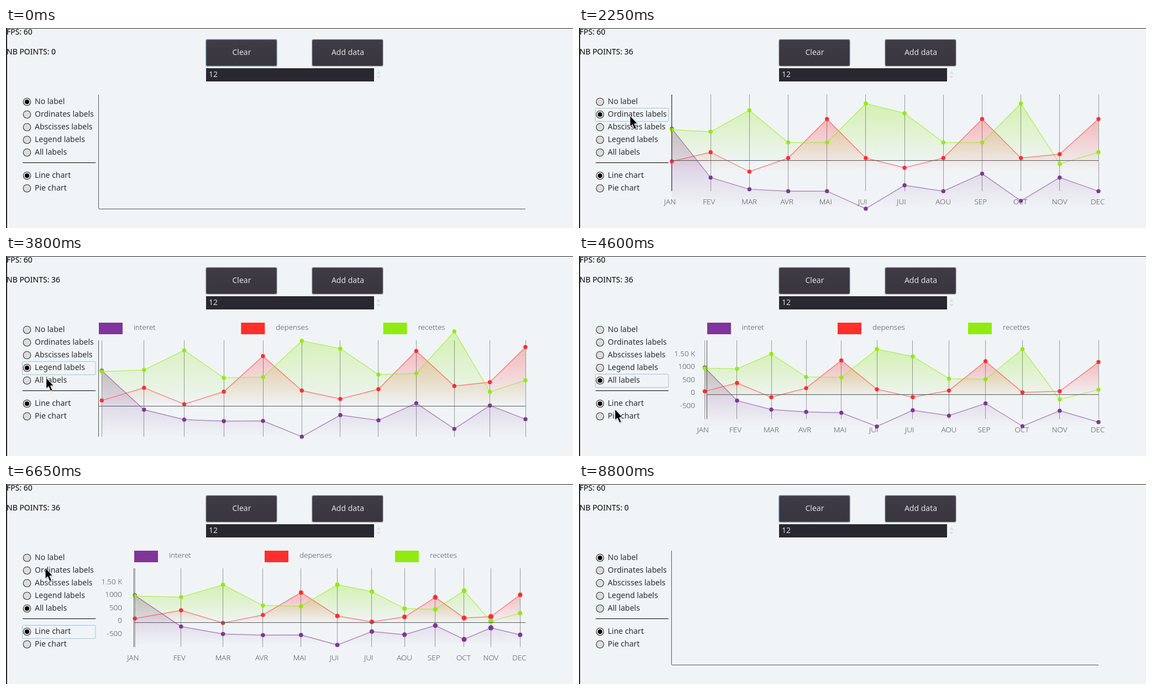
Recreate the animation shown at these times as an HTML page with a canvas. Size 1026 px wide and 363 px high, loop 9.45 s.

```html
<!DOCTYPE html>
<html>
<head>
<meta charset="utf-8">
<style>
html, body { margin: 0; width: 100%; height: 100%; overflow: hidden; background: #f0f4f6; }
canvas { display: block; }
</style>
</head>
<body>
<canvas id="stage" width="1026" height="363"></canvas>
<script>
const c = document.getElementById('stage').getContext('2d');
const LOOP = 9450, TICK = 50;
const UI = '14px "Noto Sans", sans-serif';
const THIN = '300 13.5px "Open Sans", sans-serif';

// Chart data, in units of 50
const MIN = -19, MAX = 35;
const series = [
  { name: 'interet', rgb: '127,54,152', values: [21, -3, -9, -10, -10, -19, -7, -10, -1, -15, -3, -10] },
  { name: 'depenses', rgb: '255,47,47', values: [3, 10, 0, 7, 27, 7, 2, 7, 27, 7, 9, 27] },
  { name: 'recettes', rgb: '145,235,16', values: [20.5, 20.5, 31.5, 15, 15, 35, 30, 15, 15, 35, 4, 10] }
];
const months = 'JAN FEV MAR AVR MAI JUI JUI AOU SEP OCT NOV DEC'.split(' ');
const radios = ['No label', 'Ordinates labels', 'Abscisses labels', 'Legend labels', 'All labels', 'Line chart', 'Pie chart'];

const layout = (months, values, legend) =>
  ({ months, values, legend, left: values ? 232 : 168, top: legend ? 153 : 121, bottom: months ? 296 : 328 });
const PLAIN = layout(0, 0, 0), ALL = layout(1, 1, 1);

// Clicks: time, focused radio, layout, start point of newly made dots
const ADD = 870, PIE = 4900, LINE = 6181, CLEAR = 8450;
const steps = [
  { t: ADD, row: -1, lay: PLAIN, from: [940, 328] },
  { t: 2200, row: 1, lay: layout(1, 0, 0) },
  { t: 2833, row: 2, lay: layout(0, 1, 0) },
  { t: 3500, row: 3, lay: layout(0, 0, 1) },
  { t: 4285, row: 4, lay: ALL },
  { t: LINE, row: 5, lay: ALL, from: [882, 268] },
  { t: 6860, row: 0, lay: PLAIN }
];

// Pointer stops (time, x, y) and the moments where the picture rests 150 ms
const mouse = [
  [150, 93, 0], [300, 215, 150], [650, 610, 42], [1200, 610, 42], [1350, 421, 163], [2050, 96, 148],
  [3050, 77, 203], [3550, 75, 203], [4600, 65, 278], [5300, 66, 284], [5950, 72, 262], [6200, 72, 262],
  [6650, 71, 152], [6850, 71, 127], [7900, 71, 127], [8300, 440, 42], [8650, 470, -30]
];
const rests = [650, 1200, 2050, 8300];

const mix = (a, b, p) => a + (b - a) * p;
const clamp = v => Math.max(0, Math.min(1, v));
const circOut = u => Math.sqrt(1 - (1 - u) ** 2);
const mapY = (lay, v) => mix(lay.bottom, lay.top + 16, (v - MIN) / (MAX - MIN));
const startOf = (step, i) => step.t + (step.from && i === 11 ? 245 : Math.sqrt(i) * 100);
const progress = (step, i, t) => circOut(clamp((t - startOf(step, i)) / 500));

// A dot keeps its earlier move until its turn in the new one comes.
function place(n, s, i, t) {
  const step = steps[n], p = progress(step, i, t);
  const [x, y] = step.from || place(n - 1, s, i, Math.min(t, startOf(step, i)));
  return [mix(x, mix(step.lay.left, 940, i / 11), p), mix(y, mapY(step.lay, s.values[i]), p)];
}

function box(color, x, y, w, h) {
  c.fillStyle = color;
  c.fillRect(x, y, w, h);
}

function text(str, x, y, color, font = UI, align = 'left') {
  c.font = font;
  c.textAlign = align;
  c.fillStyle = color;
  c.fillText(str, x, y);
}

function disc(x, y, r, color) {
  c.beginPath();
  c.arc(x, y, r, 0, 7);
  c.fillStyle = color;
  c.fill();
}

function poly(points, fill) {
  c.beginPath();
  points.forEach(p => c.lineTo(...p));
  c.closePath();
  c.fillStyle = fill;
  c.fill();
}

function fade(y1, y2, from, to) {
  const g = c.createLinearGradient(0, y1, 0, y2);
  g.addColorStop(0, from);
  g.addColorStop(1, to);
  return g;
}

function button(label, x, focused, hover) {
  c.beginPath();
  c.roundRect(x - 1, 20, 130, 50, 3);
  c.fillStyle = focused ? '#8db3cc' : '#b9bbbe';
  c.fill();
  c.beginPath();
  c.roundRect(x + .5, 21.5, 127, 47, 2);
  c.fillStyle = hover ? fade(21, 69, '#4d4955', '#434049') : fade(21, 69, '#403c47', '#38353e');
  c.fill();
  c.strokeStyle = focused ? '#4c6175' : '#55525b';
  c.stroke();
  text(label, x + 64.5, 49, '#e0e0e0', UI, 'center');
}

function panel(t, row, choice, pie) {
  box('#22252a', 0, 0, 1026, 1);
  box('#22252a', 0, 0, 2, 363);
  text('FPS: ' + (t >= 7150 && t < 8500 ? 59 : 60), 1, 12, '#000');
  text('NB POINTS: ' + (t < 850 || t >= CLEAR ? 0 : pie ? 3 : 36), 1, 48, '#000');
  button('Clear', 362, t < 850 || t >= CLEAR, t >= 8250 && t < 8650);
  button('Add data', 554, t >= 850 && t < 2200, t >= 600 && t < 1350);
  box('#292831', 362, 73, 304, 24);
  text('12', 367, 89, '#d8d8d8');
  poly([[670, 83], [674, 78], [678, 83]], '#dde0e2');
  poly([[670, 87], [674, 92], [678, 87]], '#dde0e2');
  box('#000', 30, 244, 132, 1);
  radios.forEach((label, i) => {
    const y = 134 + 23 * i + (i > 4 ? 19 : 0);
    if (i === row) {
      c.beginPath();
      c.roundRect(29.5, y - 11.5, 132.5, 24, 2);
      c.strokeStyle = '#9dc3db';
      c.stroke();
    }
    disc(38, y, 7.3, '#333');
    disc(38, y, 6.2, '#dcdcdc');
    if (i === choice || i === (pie ? 6 : 5)) disc(38, y, 4, '#000');
    text(label, 52, y + 4, '#2b2f33');
  });
}

function legend(lay) {
  series.forEach((s, k) => {
    const x = lay.left + k * (940 - lay.left) / 3;
    box(`rgb(${s.rgb})`, x, 121, 43, 21);
    text(s.name, x + 63, 134, '#444', THIN);
  });
}

function pieChart(t) {
  const parts = series.map(s => Math.abs(s.values[11]));
  const total = parts.reduce((a, b) => a + b);
  const turn = Math.PI * 2 * circOut(clamp((t - PIE) / 900));
  let a = -Math.PI / 2;
  series.forEach((s, k) => {
    const b = a + parts[k] / total * turn;
    c.beginPath();
    c.moveTo(554, 208.5);
    c.arc(554, 208.5, 56, a, b);
    c.fillStyle = `rgb(${s.rgb})`;
    c.fill();
    a = b;
  });
}

function shade(pts, rgb, zero) {
  const ys = pts.map(p => p[1]);
  const base = Math.max(zero, ...ys);
  poly([...pts, [pts[11][0], base], [pts[0][0], base]],
    fade(Math.min(...ys), base, `rgba(${rgb},.3)`, `rgba(${rgb},0)`));
}

function plot(t, n, zero) {
  const step = steps[n], lay = step.lay;
  const alpha = 1 - clamp((t - CLEAR) / 350);
  const lines = series.map(s => s.values.map((_, i) => place(n, s, i, t)));
  c.globalAlpha = alpha;
  lines.forEach((pts, k) => shade(pts, series[k].rgb, zero));
  lines[0].forEach(([x], i) => {
    box('rgba(40,45,50,.45)', Math.round(x - .5), lay.top, 1, lay.bottom - lay.top);
    if (lay.months) text(months[i], x - 14, 320, '#444', THIN);
  });
  lines.forEach((pts, k) => {
    c.beginPath();
    pts.forEach(p => c.lineTo(...p));
    c.strokeStyle = `rgba(${series[k].rgb},.55)`;
    c.lineWidth = 1.5;
    c.stroke();
    c.lineWidth = 1;
  });
  lines.forEach((pts, k) => pts.forEach(([x, y], i) => {
    const p = step.from ? progress(step, i, t) : 1;
    c.globalAlpha = alpha * Math.min(1, .15 + 1.6 * p);
    disc(x, y, 3.7 + 13 * (1 - p) ** 2, `rgb(${series[k].rgb})`);
  }));
  c.globalAlpha = 1;
}

function lineChart(t, n) {
  const lay = n < 0 ? PLAIN : steps[n].lay;
  const zero = n >= 0 && t < CLEAR ? Math.floor(mapY(lay, 0)) : 328;
  if (n >= 0 && t < CLEAR + 350) plot(t, n, zero);
  box('#53575b', lay.left - 1, lay.top, 1, lay.bottom - lay.top);
  box('#53575b', lay.left, zero, 940 - lay.left, 1);
  if (!lay.values) return;
  for (let v = 1500; v >= -500; v -= 500) {
    const label = v > 1000 ? (v / 1000).toFixed(2) + ' K' : v;
    text(label, 210, mapY(lay, v / 50) + 1, '#444', THIN, 'right');
  }
}

function cursor(t) {
  const k = mouse.findIndex(m => m[0] > t);
  if (k < 1) return;
  const a = mouse[k - 1], b = mouse[k], p = (t - a[0]) / (b[0] - a[0]);
  c.save();
  c.translate(mix(a[1], b[1], p), mix(a[2], b[2], p));
  c.shadowColor = 'rgba(0,0,0,.35)';
  c.shadowBlur = 2;
  c.shadowOffsetX = c.shadowOffsetY = 1;
  poly([[0, 0], [0, 20], [4.5, 16], [8, 24.5], [11.5, 23], [8, 15], [13.5, 14.5]], '#000');
  c.shadowColor = 'transparent';
  c.strokeStyle = '#fff';
  c.stroke();
  c.restore();
}

function draw(now) {
  const t = rests.find(r => now > r && now < r + 150) || now;
  box('#f0f4f6', 0, 0, 1026, 363);
  const n = steps.filter(s => s.t <= t).length - 1;
  const pie = t >= PIE && t < LINE;
  const row = n < 0 || t >= CLEAR ? -1 : pie ? 6 : steps[n].row;
  const choice = n < 1 ? 0 : Math.min(4, steps[n].row);
  // The label choice stays on "All" while the chart type is switched.
  panel(t, row, choice, pie);
  if (n >= 0 && steps[n].lay.legend) legend(steps[n].lay);
  if (pie) pieChart(t); else lineChart(t, n);
  cursor(t);
}

let last = -1;
function frame() {
  const t = Math.floor(performance.now() % LOOP / TICK) * TICK;
  if (t !== last) draw(last = t);
  requestAnimationFrame(frame);
}
frame();
</script>
</body>
</html>
```
